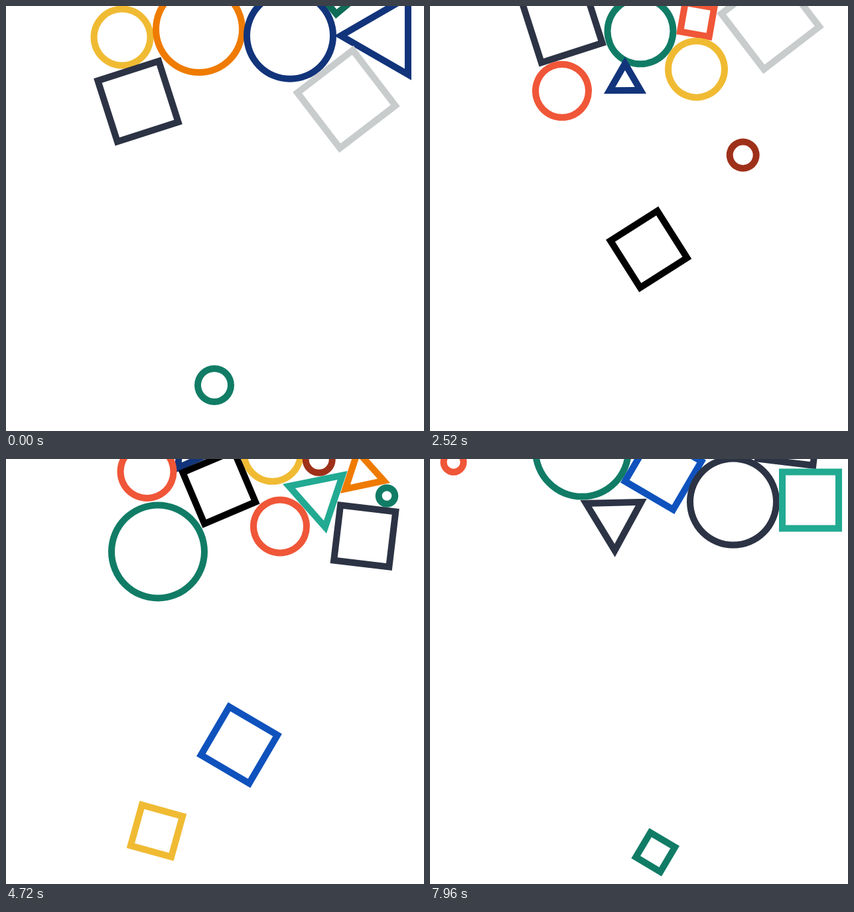
An HTML page with a canvas that plays this animation: 630x640 px, repeating every 8000 ms.

```html
<!DOCTYPE html>
<html lang="en">
<head>
<meta charset="utf-8">
<title>Rising shapes</title>
<style>
  html, body { margin: 0; width: 100%; height: 100%; overflow: hidden; background: #fff; }
  canvas { display: block; }
</style>
</head>
<body>
<canvas id="stage" width="630" height="640"></canvas>
<script>
const LOOP = 8000, FRAME = 40;
const SCROLL = 0.0472;   // px per ms, drift of the whole pile
const LIFT = 0.0007;     // half the upward acceleration, px per ms²
const GROWTH = 0.25;     // px of radius per ms after birth
const SLIDE = 800;       // ms a shape takes to roll into its final place
const GAP = 180;         // ms between the shapes of one burst
const STROKE = 10;
const LOW = 610, MIDDLE = 581, HIGH = 523;   // launch heights

const YELLOW = '#f0bb33', ORANGE = '#ef7b00', NAVY = '#12347b', GREEN = '#117c66',
      PINE = '#0f6b56', GREY = '#c9cccc', SLATE = '#2c3344', RED = '#f05638',
      BLACK = '#000', BROWN = '#9e3019', TEAL = '#22aa92', BLUE = '#0f52bd';

// x and y are the final place in the pile, with y as it would be at time 0.
// slide holds the offset before the shape rolls there, and optionally when.
const polygon = sides => (color, radius, x, y, angle, slide) =>
  ({ sides, color, radius, x, y, angle, slide: { dx: 0, dy: 0, turn: 0, ...slide } });
const triangle = polygon(3), square = polygon(4);
const circle = (color, radius, x, y, slide) => polygon(Infinity)(color, radius, x, y, 0, slide);

const shapes = [];
function launch(time, height, ...burst) {
  burst.forEach((shape, i) => {
    const birth = time + i * GAP;
    const climb = height - (shape.y + shape.slide.dy - SCROLL * birth);
    // The flight meets the drifting pile where LIFT·τ² − SCROLL·τ = climb.
    const flight = (SCROLL + Math.sqrt(SCROLL ** 2 + 4 * LIFT * climb)) / (2 * LIFT);
    shapes.push({ ...shape, birth, height, landing: birth + flight });
  });
}

launch(-LOOP, LOW,
  circle(YELLOW, 47.5, 175, 47),
  circle(ORANGE, 70, 291, 35),
  circle(NAVY, 70, 428, 44.7),
  square(PINE, 40, 500.6, -20.8, 95),
  triangle(NAVY, 77.5, 572.2, 44.7, 180),
  square(GREY, 81.5, 513, 140.3, 7.5),
  square(SLATE, 75.2, 199, 143.6, 27.2));
launch(-120, MIDDLE,
  circle(GREEN, 54.5, 317, 156.8, { dx: -3 }),
  square(RED, 38.4, 402.7, 139.5, 55));
launch(642, MIDDLE, circle(YELLOW, 47.5, 401.5, 214.1, { dx: -66, dy: 36 }));
launch(1507, HIGH,
  triangle(NAVY, 37, 274.7, 214.3, 5.5, { dx: 38, dy: 21, turn: 48 }),
  circle(RED, 45, 212.5, 241.8, { dx: -13.5, dy: 5, at: 3700 }),
  circle(BROWN, 25, 471.7, 223.6),
  square(BLACK, 66.2, 321.2, 265.4, 22, { dx: 8.5, dy: 11, turn: -9.4, at: 3700 }));
launch(2526, LOW, triangle(TEAL, 57.5, 471.5, 278.8, 78.5));
launch(3033, LOW, triangle(ORANGE, 44.2, 537, 245.1, 18.2));
launch(3284, LOW,
  circle(GREEN, 17.3, 574, 278.3),
  circle(GREEN, 75, 229, 362.3),
  circle(RED, 45, 413, 324.3),
  square(SLATE, 66.3, 540.7, 338.8, 51.8));
launch(4214, LOW, square(BLUE, 66.6, 351.5, 394.3, 75.4));
launch(4453, LOW, square(YELLOW, 52, 62, -418, 120, { dx: 165, dy: 900, turn: -59.5 }));
launch(5298, LOW, circle(SLATE, 70, 457, 440.2));
launch(5404, LOW, square(GREY, 38, 118, 308, 40, { dx: 108, dy: 162, turn: -37, at: 6500 }));
launch(5955, LOW, circle(RED, 20, 35.5, 380.4, { dx: 84.5 }));
launch(6474, LOW, square(TEAL, 67.2, 573.5, 437.7, 45));
launch(7098, LOW, triangle(SLATE, 58, 277.3, 465, 88.6));
launch(7800, LOW, square(GREEN, 37.5, 339.7, 430, 75.7));

function poseAt({ x, y, angle, birth, height, landing, slide }, t) {
  const progress = (t - (slide.at ?? landing)) / SLIDE;
  const phase = Math.min(1, Math.max(0, progress)) * Math.PI / 2;
  const left = 1 - Math.sin(phase);   // sideways first, then up: a quarter arc
  const pileY = y + slide.dy * Math.cos(phase) - SCROLL * t;
  return {
    x: x + slide.dx * left,
    y: t < landing ? height - LIFT * (t - birth) ** 2 : pileY,
    angle: angle + slide.turn * left,
  };
}

const ctx = document.getElementById('stage').getContext('2d');

function outline(sides, radius) {
  ctx.moveTo(radius, 0);
  if (sides === Infinity) {
    ctx.arc(0, 0, radius, 0, 2 * Math.PI);
  } else {
    for (let i = 1; i < sides; i++) {
      const a = 2 * Math.PI * i / sides;
      ctx.lineTo(radius * Math.cos(a), radius * Math.sin(a));
    }
  }
  ctx.closePath();
}

function drawShape(shape, t) {
  const { sides, color, radius, birth } = shape;
  if (t < birth) return;
  const { x, y, angle } = poseAt(shape, t);
  const outer = Math.min(radius, GROWTH * (t - birth));
  const inner = outer - STROKE / Math.cos(Math.PI / sides);
  ctx.save();
  ctx.translate(x, y);
  ctx.rotate(angle * Math.PI / 180);
  ctx.fillStyle = color;
  ctx.beginPath();
  outline(sides, outer);
  if (inner > 0) outline(sides, inner);
  ctx.fill('evenodd');
  ctx.restore();
}

const start = performance.now();
function render() {
  const elapsed = (performance.now() - start) % LOOP;
  const t = Math.floor(elapsed / FRAME) * FRAME;
  ctx.fillStyle = '#fff';
  ctx.fillRect(0, 0, 630, 640);
  shapes.forEach(shape => drawShape(shape, t));
  requestAnimationFrame(render);
}
render();
</script>
</body>
</html>
```
